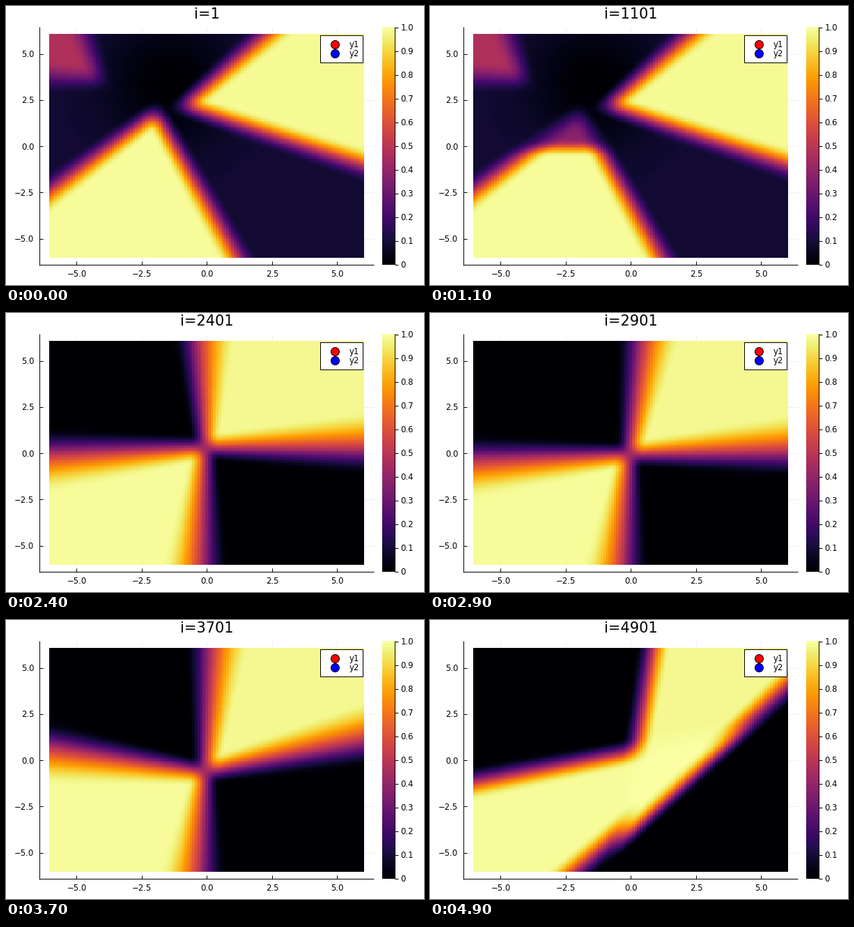
A matplotlib script that plays this animation: 600 by 400 pixels, repeating every 5 s.

```python
import numpy as np
import matplotlib.pyplot as plt
from matplotlib.animation import FuncAnimation

plt.rcParams["font.family"] = "DejaVu Sans"
WIDTH, HEIGHT, DPI = 600, 400, 100
FRAMES, INTERVAL = 50, 100
LEFT, RIGHT, TOP, BOTTOM = 62, 514, 40, 361
CELLS = 121
PX = 72 / DPI

# The field is built in stage pixels, sampled at cell centres.
steps = (np.arange(CELLS) + 0.5) / CELLS
X, Y = np.meshgrid(LEFT + steps * (RIGHT - LEFT), TOP + steps * (BOTTOM - TOP))

# Where each boundary meets its side of the plot, at a few key frames.
KEYS = [11, 17, 24, 29, 37, 49]
TOP_X = [375, 272, 277, 305, 295, 320]
RIGHT_Y = [228, 209, 194, 198, 172, 92]
BOTTOM_X = [332, 294, 280, 276, 277, 207]
LEFT_Y = [267, 203, 203, 212, 183, 233]


def ramp(frame, start, end):
    return np.clip((frame - start) / (end - start), 0, 1)


def soft_step(dist, dark, bright):
    """Rise from 0 to 1, reaching each end at its own distance."""
    reach = np.where(dist < 0, dark, bright)
    return 0.5 + 0.5 * np.sin(np.pi / 2 * np.clip(dist / reach, -1, 1))


def edge(apex, end, side, fan):
    """Soft half-plane beside a line; its blur opens away from the apex."""
    (ax, ay), (bx, by) = apex, end
    dx, dy = bx - ax, by - ay
    length = np.hypot(dx, dy)
    along = np.clip(((X - ax) * dx + (Y - ay) * dy) / length**2, 0, 1.1)
    dist = side * ((X - ax) * dy - (Y - ay) * dx) / length
    return soft_step(dist, 20 + (6 + 16 * fan) * along, 20 + (6 + 30 * fan) * along)


def wedge(apex, steep_end, flat_end, fan, side=1):
    return edge(apex, steep_end, -side, fan) * edge(apex, flat_end, side, fan)


def union(*parts):
    return 1 - np.prod([1 - part for part in parts], axis=0)


def field(frame):
    # Two wedges first meet at a crossing, then overlap into one region.
    meet, sink, merge = ramp(frame, 11, 17), ramp(frame, 24, 37), ramp(frame, 37, 49)
    fan = meet * (1 - merge)
    cross = np.array([286, 193 + 25 * sink])

    def apex(start, end):
        return (1 - meet) * np.array(start) + (meet - merge) * cross + merge * np.array(end)

    top, right, bottom, left = (np.interp(frame, KEYS, track)
                                for track in (TOP_X, RIGHT_Y, BOTTOM_X, LEFT_Y))
    upper = wedge(apex((255, 143), (275, 314)), (top, TOP), (RIGHT, right), fan)
    lower = wedge(apex((215, 153), (440, 160)), (bottom, BOTTOM), (LEFT, left), fan)
    dimming = 0.65 * np.sin(np.pi * ramp(frame, 5, 17))
    lower *= 1 - dimming * soft_step(203 - Y, 14, 14)

    corner = 0.42 * (1 - meet) * wedge((135, 106), (112, TOP), (LEFT, 102), 0, -1)
    hole = np.exp(-((X - 235) ** 2 + (Y - 110) ** 2) / (2 * 62**2))
    haze = (0.09 - 0.085 * meet) * (1 - hole)
    return union(0.98 * upper, 0.985 * lower, corner, haze)


fig = plt.figure(figsize=(WIDTH / DPI, HEIGHT / DPI), dpi=DPI, facecolor="white")
ax = fig.add_axes([0, 0, 1, 1])
ax.axis("off")


def line(xs, ys, color="black", z=3):
    ax.plot(xs, ys, color=color, lw=PX, zorder=z, solid_capstyle="butt")


def label(x, y, text, ha, size=11.6):
    return ax.text(x, y, text, ha=ha, va="baseline", fontsize=size * PX, zorder=6)


def heat(values, extent):
    return ax.imshow(values, cmap="inferno", vmin=0, vmax=1, aspect="auto",
                     interpolation="nearest", extent=extent, zorder=1)


for value in np.linspace(-5, 5, 5):
    text = f"{value:.1f}".replace("-", "\u2212")
    x, y = 288.2 + 37.35 * value, 201.2 - 26.5 * value
    line([x, x], [30, 371], "#f0f0f0", 0)
    line([48, 528], [y, y], "#f0f0f0", 0)
    line([x, x], [371, 366])
    line([48, 53], [y, y])
    label(x + 0.3, 387.5, text, "center")
    label(40.5, y + 4.5, text, "right")
line([48, 48], [30, 371.5])
line([48, 528], [371, 371])

image = heat(field(0), (LEFT, RIGHT, BOTTOM, TOP))

# Colour bar
heat(np.linspace(1, 0, 256)[:, None], (540, 558, 371, 30.5))
line([558, 558], [30, 371])
for k in range(11):
    y = 371 - 34.05 * k
    line([558, 563], [y, y])
    label(566.5, y + 4.2, f"{k / 10:.1f}" if k else "0", "left")

# Legend
ax.add_patch(plt.Rectangle((451, 42), 61, 39, fc="white", ec="black", lw=PX, zorder=4))
for y, color, name in ((55, "red", "y1"), (68, "blue", "y2")):
    ax.plot([472], [y], "o", ms=12 * PX, mfc=color, mec="black", mew=PX, zorder=5)
    label(493, y + 4.3, name, "left")

title = label(288.5, 18, "", "center", 20.9)
ax.set_xlim(0, WIDTH)
ax.set_ylim(HEIGHT, 0)


def update(frame):
    image.set_data(field(frame))
    title.set_text(f"i={100 * frame + 1}")
    return image, title


anim = FuncAnimation(fig, update, frames=FRAMES, interval=INTERVAL, repeat=True, repeat_delay=0)
plt.show()
```
